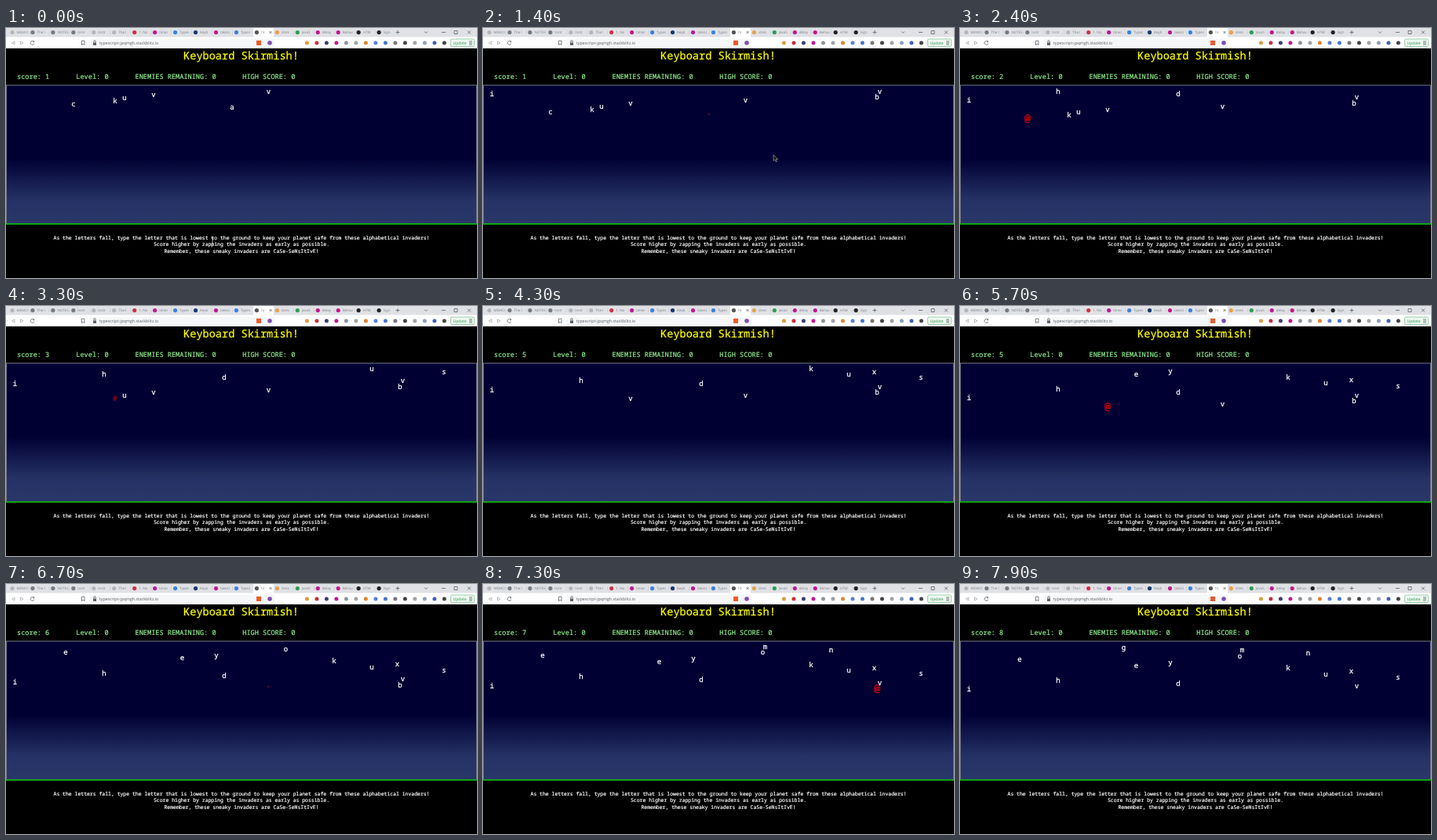
An HTML page that plays this animation: 600 by 319 pixels, repeating every 8 s.

```html
<!DOCTYPE html>
<html lang="en">
<head>
<meta charset="utf-8">
<title>Keyboard Skirmish!</title>
<style>
  html, body { margin: 0; width: 100%; height: 100%; overflow: hidden; background: #000; }
  svg { display: block; width: 100%; height: 100%; }
  text { font-family: "Noto Sans Mono", "DejaVu Sans Mono", monospace; text-rendering: geometricPrecision; white-space: pre; }
  #chrome text { font-family: "Open Sans", "Noto Sans", sans-serif; font-size: 4.5px; fill: #7d8187; }
  #chrome .url { font-size: 5.3px; fill: #55595f; }
  #chrome .update { font-size: 5px; fill: #2f9150; }
  .line { fill: none; stroke: #5b6067; stroke-width: .8; }
  .nav { stroke: #a5a8ac; }
  .title { font-size: 13.6px; fill: #ff0; stroke: #ff0; stroke-width: .25; }
  #stats { font-size: 8.6px; fill: #90ee90; stroke: #90ee90; stroke-width: .2; }
  #help { font-size: 6.45px; fill: #fff; stroke: #fff; stroke-width: .2; }
  #invaders { font-size: 9px; stroke-width: .3; }
  .mid, #invaders text, #help text { text-anchor: middle; }
</style>
</head>
<body>
<svg viewBox="0 0 600 319" preserveAspectRatio="none">
  <defs>
    <linearGradient id="sky" x2="0" y2="1">
      <stop offset="0" stop-color="#000033"/>
      <stop offset=".53" stop-color="#000033"/>
      <stop offset=".83" stop-color="#263265"/>
      <stop offset="1" stop-color="#2a3769"/>
    </linearGradient>
  </defs>
  <rect width="600" height="319"/>
  <g id="chrome">
    <rect width="600" height="12" fill="#dfe1e5"/>
    <rect y="11.5" width="600" height="14.5" fill="#fff"/>
    <rect x="315" width="26" height="12.5" fill="#fff"/>
    <g id="tabs"></g>
    <path class="line" d="M335.500 4l3 3m0-3l-3 3M496.500 5.500h5m-2.500-2.500v5M533 4.500l2 2 2-2M555 5.500h5M571 3.500h4v4h-4zM588 3.500l4 4m0-4l-4 4"/>
    <path class="line nav" d="M11 17l-3.500 2 3.500 2zM18.500 17l3.500 2-3.500 2z"/>
    <path class="line" d="M35.500 17.500a2.400 2.400 0 1 0 .4 2.300m-.2-3.600v1.700h-1.700M96.500 16.300h3.500v5.500l-1.750-1.500-1.750 1.500z"/>
    <rect x="106" y="13.500" width="236" height="11" rx="1.500" fill="#f6f7f8"/>
    <path d="M111 18.500h4v3.500h-4z" fill="#5b6067"/>
    <path class="line" d="M111.800 18.500v-1.500a1.200 1.200 0 0 1 2.400 0v1.500"/>
    <text class="url" x="119" y="21">typescript-jpqmgh.stackblitz.io</text>
    <g id="badges"></g>
    <rect x="566.500" y="14" width="30" height="9.500" rx="1.500" fill="#eef8f1" stroke="#78bd8d" stroke-width=".7"/>
    <text class="update" x="569.500" y="20.700">Update</text>
    <path class="line" d="M590 17h4m-4 2h4m-4 2h4"/>
  </g>
  <text class="title mid" x="299.500" y="40">Keyboard Skirmish!</text>
  <g id="stats">
    <text id="score" x="14" y="64.700"></text>
    <text x="89.300" y="64.700">Level: 0</text>
    <text x="164.500" y="64.700">ENEMIES REMAINING: 0</text>
    <text x="301.300" y="64.700">HIGH SCORE: 0</text>
  </g>
  <rect x=".5" y="73" width="599" height="177" fill="url(#sky)" stroke="#777a86"/>
  <rect y="249.200" width="600" height="1.700" fill="#08b008"/>
  <g id="help">
    <text x="300" y="270">As the letters fall, type the letter that is lowest to the ground to keep your planet safe from these alphabetical invaders!</text>
    <text x="300" y="278.300">Score higher by zapping the invaders as early as possible.</text>
    <text x="300" y="286.700">Remember, these sneaky invaders are CaSe-SeNsItIvE!</text>
  </g>
  <g id="invaders"></g>
  <path id="beam" d="M-1.500-4h3M0-4v8M-1.500 4h3" fill="none" stroke="#ddd" stroke-width=".8" transform="translate(263 272)"/>
  <path id="arrow" d="M0 0v7.500l1.800-1.600 1.400 3 1.300-.6-1.400-2.900h2.500z" fill="#111" stroke="#bbb" stroke-width=".6"/>
</svg>
<script>
const LOOP = 8000, STEP = 100, SPAWN = 500, DROP = 3.83, BLAST = 600;
const $ = id => document.getElementById(id);

function add(parent, tag, attrs, text = "") {
  const el = document.createElementNS("http://www.w3.org/2000/svg", tag);
  for (const key in attrs) el.setAttribute(key, attrs[key]);
  el.textContent = text;
  return parent.appendChild(el);
}

const dot = (parent, cx, cy, r, fill) => add(parent, "circle", { cx, cy, r, fill });

// Browser tabs: label and icon colour
const GREY = "#777c83", PALE = "#b4b6b9", PINK = "#c2188f", BLUE = "#3b82dc";
[["MEMO", PALE], ["The l", GREY], ["NOTES", GREY], ["Instr", GREY], ["Instr", PALE],
 ["The l", PALE], ["1. No", "#d03048"], ["timer", PINK], ["Types", BLUE], ["Keyb", "#183a70"],
 ["takeU", PINK], ["Types", BLUE], ["ht", "#555"], ["stres", "#e8a14a"], ["JavaS", "#2f9d57"],
 ["delay", PINK], ["Behav", PINK], ["HTM", "#222"], ["Sign", "#222"]
].forEach(([label, color], i) => {
  const x = 8 + i * 25.95;
  dot($("tabs"), x, 5.6, 2.6, color);
  add($("tabs"), "text", { x: x + 5.5, y: 7.3 }, label);
  if (i < 18 && i !== 11 && i !== 12)
    add($("tabs"), "path", { d: `M${x + 21} 3v5`, stroke: "#c2c5ca", "stroke-width": .5 });
});

// Toolbar badges
add($("badges"), "rect", { x: 319, y: 16, width: 6, height: 6, fill: "#f05a2b" });
dot($("badges"), 336, 19, 2.8, "#8050b0");
["#e09a3c", "#c8303a", "#3a3f70", "#c2188f", "#8f9499", "#a0a4a8", "#e08530", "#5a7fd8",
 "#4777c5", "#777", "#444", "#a0a4a8", "#8fa0c0", "#3f62b8", "#444"]
  .forEach((color, i) => dot($("badges"), 383.4 + i * 12.5, 19, 2.5, color));

// One invader appears every half second, all fall at the same speed
const letters = "ackuvvbivdhsuxkeyeonmg";
const columns = [288, 86, 139, 151, 188, 334.5, 502, 11.5, 505.5, 278, 125, 558, 466, 498.5,
  418, 224.5, 268, 76, 356.5, 443.5, 359.5, 208.5];
const hits = [900, 2300, 3000, 3600, 5600, 6200, 7200];
const invaders = columns.map(x => add($("invaders"), "text", { x }));

function drawInvader(el, n, t) {
  const y = 100.5 + DROP * (t / SPAWN - n);
  const blast = (t - (hits[n] ?? Infinity)) / BLAST;
  const shown = y > 79.4 && blast < 1;
  el.style.display = shown ? "" : "none";
  if (!shown) return;
  const hit = blast >= 0;
  const [glyph, size, color] = !hit ? [letters[n], 9, "#fff"]
    : blast < .35 ? ["@", 13.5, "#d80008"]
    : blast < .7 ? ["#", 9, "#8c0818"]
    : ["*", 5.5, "#700820"];
  el.textContent = glyph;
  el.style.fontSize = size + "px";
  el.style.fill = el.style.stroke = color;
  el.setAttribute("y", y + (hit ? size * .33 : 3));
}

function draw(t) {
  invaders.forEach((el, n) => drawInvader(el, n, t));
  $("score").textContent = "score: " + (1 + hits.filter(h => t >= h + BLAST).length);

  const p = Math.min(1, Math.max(0, (t - 300) / 500));
  const ease = p * p * (3 - 2 * p);
  $("beam").style.display = t < 300 ? "" : "none";
  $("arrow").style.display = t >= 300 && t < 2300 ? "" : "none";
  $("arrow").setAttribute("transform", `translate(${263 + 107 * ease} ${270 - 108 * ease})`);
}

const start = performance.now();
function tick() {
  const t = (performance.now() - start) % LOOP;
  draw(Math.floor(t / STEP) * STEP);
  requestAnimationFrame(tick);
}
tick();
</script>
</body>
</html>
```
